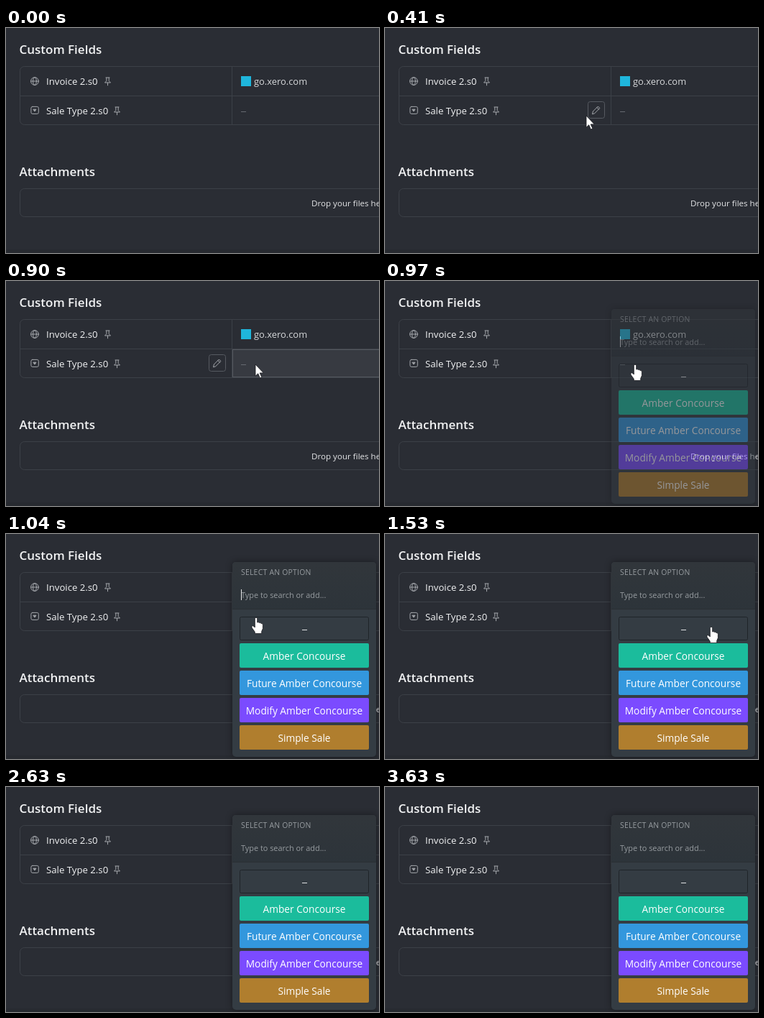
Recreate the animation shown at these times as an HTML page. Size 519 by 313 pixels, loop 3690 ms.

```html
<!DOCTYPE html>
<html lang="en">
<head>
<meta charset="utf-8">
<title>Custom Fields</title>
<style>
html, body { margin: 0; width: 100%; height: 100%; overflow: hidden; background: #2a2d34; }
svg { display: block; width: 519px; height: 313px; }
text { font: 13.2px "Open Sans", "Noto Sans", sans-serif; fill: #f2f3f4; }
.head { font-size: 17px; font-weight: 600; }
.link { font-size: 12.9px; fill: #d6d8da; }
.drop { font-size: 11.6px; fill: #e4e5e7; }
.cap { font-size: 10.4px; letter-spacing: .25px; fill: #979ca0; }
.hint { font-size: 10.9px; fill: #979ca0; }
.mid { font-size: 13.7px; text-anchor: middle; fill: #fff; }
.line { fill: none; stroke: #3c4047; }
.icon { fill: none; stroke: #a4a7ac; stroke-linecap: round; stroke-linejoin: round; }
.cursor { fill: #fff; stroke: #17191d; stroke-width: .8; stroke-linejoin: round; }
#panel { filter: drop-shadow(0 0 5px #0006); }
</style>
</head>
<body>
<svg viewBox="0 0 519 313">
  <defs>
    <path id="pin" class="icon" d="M-2.5-5.5h5M-1.7-5.2v4.4L-4 1.5h8L1.7-.8v-4.4M0 1.7v3.6"/>
    <linearGradient id="top" x2="0" y2="1">
      <stop stop-color="#31363b"/>
      <stop offset="1" stop-color="#2d343a"/>
    </linearGradient>
  </defs>
  <rect y="308" width="519" height="5" fill="#272a30"/>

  <text class="head" x="18.5" y="36">Custom Fields</text>
  <rect class="line" x="19.5" y="53.5" width="520" height="81" rx="6"/>
  <path class="line" d="M20 94.5H519M314.5 54V134"/>
  <rect id="cell" x="315.5" y="95.5" width="220" height="38" fill="#373a41" stroke="#555960"/>

  <g class="icon">
    <circle cx="40" cy="74" r="5.4"/>
    <ellipse cx="40" cy="74" rx="2.4" ry="5.4"/>
    <path d="M34.8 74h10.4"/>
    <rect x="34.9" y="109.4" width="10.4" height="10" rx="2"/>
    <path d="M38.2 113.2h3.8l-1.9 2.6z" fill="#a4a7ac"/>
  </g>
  <text x="56" y="79">Invoice 2.s0</text>
  <text x="56" y="120">Sale Type 2.s0</text>
  <use href="#pin" x="141.5" y="74.5"/>
  <use href="#pin" x="154.5" y="115.5"/>

  <rect x="327" y="67" width="14" height="14" fill="#1fb6dc"/>
  <text class="link" x="345" y="79">go.xero.com</text>
  <path d="M327 116.5h7" stroke="#666a71"/>

  <g id="edit">
    <rect class="line" x="282.5" y="102.5" width="23" height="23" rx="3" style="stroke:#565a61"/>
    <path class="icon" d="M288.6 119.4l.8-3.4 7-7 2.5 2.5-7 7zM294.9 110.6l2.5 2.5"/>
  </g>

  <text class="head" x="18.5" y="206">Attachments</text>
  <rect class="line" x="19.5" y="223.5" width="520" height="39" rx="6"/>
  <text class="drop" x="425" y="248">Drop your files here</text>

  <g id="menu">
    <rect id="panel" x="315" y="39" width="200" height="271" rx="5" fill="#343c43"/>
    <path d="M315 105V44q0-5 5-5h190q5 0 5 5v61z" fill="url(#top)"/>
    <path d="M315 104.5h200" stroke="#2a2f34"/>
    <text class="cap" x="327" y="57">SELECT AN OPTION</text>
    <text class="hint" x="327" y="89">Type to search or add...</text>
    <rect id="caret" x="327" y="77" width="1" height="15" fill="#e8e9eb"/>
    <rect x="325.5" y="115.5" width="179" height="32" rx="2" fill="#343c43" stroke="#1f2429"/>
    <path d="M412 133.5h7" stroke="#dfe1e3"/>
    <g id="options"></g>
  </g>

  <path id="arrow" class="cursor" d="M0 0V16.3l3.7-3.5 2.7 6.2 2.5-1.1-2.7-6H11.3Z"/>
  <path id="hand" class="cursor" d="M-1.7 1.5Q0-1.5 1.7 1.5V7Q3.2 6 4.5 7.6 6 6.8 7 8.4 9.4 8 9.4 10.5V15.5L7.7 19.5V22.5H-1.7V20.3L-6 14.2Q-6.5 10-2.8 12.8L-1.7 14Z"/>
</svg>
<script>
const LOOP = 3690, TICK = 70, START = 130, OPEN = 970, BLINK = 530;
const $ = id => document.getElementById(id);

const options = {
  "Amber Concourse": "#1bbc9c",
  "Future Amber Concourse": "#3397dd",
  "Modify Amber Concourse": "#7b4bff",
  "Simple Sale": "#b07e2e"
};
$("options").innerHTML = Object.entries(options).map(([label, color], i) => {
  const y = 152 + i * 38;
  return `<rect x="325" y="${y}" width="180" height="34" rx="2" fill="${color}"/>
    <text class="mid" x="415" y="${y + 23}">${label}</text>`;
}).join("");

// Where the pointer turns: time, x, y
const turns = [
  [130, 291, 273], [340, 270, 142], [410, 280, 122], [760, 347, 117],
  [1180, 348, 115], [1740, 503, 135], [1810, 511, 170], [1960, 524, 181]
];

const clamp = u => Math.min(1, Math.max(0, u));
const ease = u => u * u * (3 - 2 * u);
const show = (id, on) => $(id).setAttribute("visibility", on ? "inherit" : "hidden");

function pointer(t) {
  const i = Math.max(1, turns.findIndex(p => p[0] > t));
  const [b, a] = t < turns.at(-1)[0] ? [turns[i], turns[i - 1]] : [turns.at(-1), turns.at(-2)];
  const u = ease(clamp((t - a[0]) / (b[0] - a[0])));
  return [a[1] + (b[1] - a[1]) * u, a[2] + (b[2] - a[2]) * u];
}

function draw(time) {
  const t = START + Math.floor((time - START) / TICK) * TICK;
  const [x, y] = pointer(t).map(Math.round);
  const open = t >= OPEN;
  const inRow = !open && y > 95 && y < 134;

  show("menu", open);
  $("menu").setAttribute("opacity", clamp((t - OPEN + TICK) / (2 * TICK)));
  show("caret", open && Math.floor((time - OPEN - 10) / BLINK) % 2 !== 1);
  show("edit", inRow);
  show("cell", inRow && x >= 315);
  show("arrow", t >= START && !open);
  show("hand", open && x < 519);
  $(open ? "hand" : "arrow").setAttribute("transform", `translate(${x} ${y})`);
}

const begin = performance.now();
function tick(now) {
  draw(Math.max(0, now - begin) % LOOP);
  requestAnimationFrame(tick);
}
draw(0);
requestAnimationFrame(tick);
</script>
</body>
</html>
```
